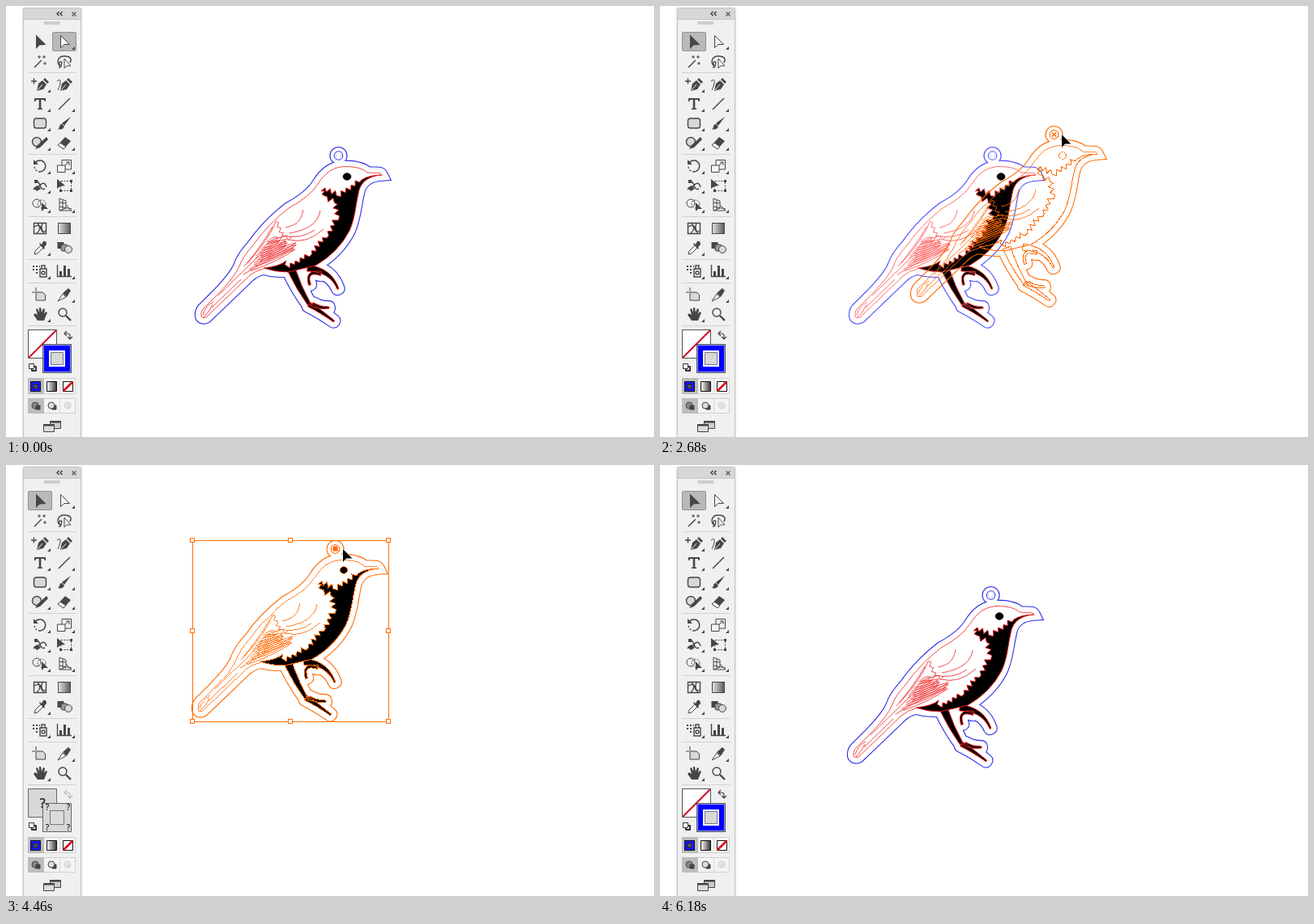
Animation of 800x533 px, one loop 6.55 s. Source, as an HTML page:

```html
<!DOCTYPE html>
<html lang="en">
<head>
<meta charset="utf-8">
<title>Moving a drawing</title>
<style>
html, body { margin: 0; width: 100%; height: 100%; overflow: hidden; background: #fff; }
svg { display: block; width: 800px; height: 533px; }
.cut { fill: none; stroke: var(--cut); }
.etch { fill: none; stroke: var(--etch); stroke-width: .8; }
.ink { fill: var(--ink); stroke: var(--etch); }
.eye { fill: var(--ink); stroke: var(--edge); }
.plain { --cut: #2c2ce6; --etch: #ee1c1c; --ink: #000; --edge: #000; }
.dim { --cut: #4a4aff; --etch: #ff4848; --ink: #000; --edge: #000; }
.picked { --cut: #ff6a00; --etch: #ff6a00; --ink: #000; --edge: #ff6a00; }
.ghost { --cut: #ff6a00; --etch: #ff6a00; --ink: none; --edge: #ff6a00; }
.picked, .ghost { shape-rendering: crispEdges; }
.hull { stroke-linejoin: round; }
.icon { fill: none; stroke: #464646; stroke-width: 1.4; }
.icon .f { fill: #464646; stroke: none; }
.icon .l { fill: #d8d8d8; }
.icon .w { fill: #f4f4f4; }
.thin { stroke-width: 1; }
.q { font: 600 10px "Open Sans", sans-serif; text-anchor: middle; fill: #222; }
</style>
</head>
<body>
<svg viewBox="0 0 800 533">
  <defs>
    <linearGradient id="fade"><stop stop-color="#fff"/><stop offset="1" stop-color="#333"/></linearGradient>
    <linearGradient id="soft"><stop stop-color="#e4e4e4"/><stop offset="1" stop-color="#5a5a5a"/></linearGradient>
    <g id="hull" class="hull"></g>
    <mask id="rim" maskUnits="userSpaceOnUse" x="220" y="160" width="270" height="250">
      <use href="#hull" fill="#fff" stroke="#fff" stroke-width="15.800"/>
      <use href="#hull" fill="#000" stroke="#000" stroke-width="13.600"/>
    </mask>
    <g id="bird"></g>
  </defs>
  <use id="base" href="#bird"/>
  <g id="frame" fill="#fff" stroke="#ff6a00"></g>
  <g id="ghost" class="ghost">
    <use href="#bird"/>
    <path d="M408 182.500l5 5m0-5l-5 5" stroke="#ff6a00" fill="none"/>
  </g>

  <g id="panel">
    <rect x="19.500" y="1.500" width="75" height="540" rx="3" fill="#ececec"/>
    <rect x="21.500" y="2.500" width="71" height="540" rx="2" fill="#f0f0f0" stroke="#c4c4c4"/>
    <path d="M22 16V4q0-1 1-1H91q1 0 1 1V16z" fill="#d7d7d7"/>
    <path d="M22 16.500H92" stroke="#c4c4c4"/>
    <path d="M65.500 7l-2.500 2.500 2.500 2.500M69.500 7l-2.500 2.500 2.500 2.500" fill="none" stroke="#333" stroke-width="1.300"/>
    <path d="M81.500 7.500l5 5m0-5l-5 5" stroke="#666" stroke-width="1.600"/>
    <path d="M47 21H67" stroke="#aaa" stroke-width="4" stroke-dasharray="1 1"/>
    <rect id="hover" x="27.500" y="32.500" width="29" height="23" rx="1.500" fill="#e0e0e0" stroke="#aaa"/>
    <rect id="active" y="32.500" width="29" height="23" rx="1.500" fill="#bab8b8" stroke="#949191"/>
    <g id="tools"></g>

    <g id="solid">
      <path d="M27.500 400.500h35v35h-35z" fill="#fff" stroke="#555"/>
      <path d="M28 435L62 401" stroke="#c8102e" stroke-width="2"/>
      <path d="M45.500 418.500h35v35h-35z" fill="#00f" stroke="#555"/>
      <path d="M46.500 419.500h33v33h-33z" fill="none" stroke="#fff" stroke-width=".6"/>
      <path d="M54 427h18v18h-18z" fill="#d8d8d8" stroke="#fff" stroke-width="2"/>
      <path d="M55.500 428.500h15v15h-15z" fill="none" stroke="#777"/>
    </g>
    <g id="mixed">
      <path d="M27.500 400.500h35v35h-35z" fill="#d8d8d8" stroke="#666"/>
      <text class="q" x="45" y="424" style="font-size:16px">?</text>
      <path d="M45.500 418.500h35v35h-35z" fill="#d8d8d8" stroke="#666"/>
      <path d="M54.500 427.500h17v17h-17z" fill="#dcdcdc" stroke="#777"/>
      <g class="q"><text x="51" y="427">?</text><text x="77" y="427">?</text><text x="51" y="452">?</text><text x="77" y="452">?</text></g>
    </g>
    <path id="swap" d="M75 402l-3 3 3 3M72 405h4q3 0 3 3v4M76 409l3 3 3-3" fill="none" stroke="#444" stroke-width="1.200"/>
    <path d="M31.500 445.500h6v6h-6z" fill="#333" stroke="#333"/><path d="M33 447h3v3h-3z" fill="#fff"/>
    <path d="M28.500 442.500h6v6h-6z" fill="#fff" stroke="#333"/>

    <path d="M27.500 460.500h58v19h-58zM27.500 485.500h58v18h-58z" fill="#f4f4f4" stroke="#d0d0d0"/>
    <path d="M27 460h20v20h-20zM27 485h20v19h-20z" fill="#bdbdbd"/>
    <path d="M66.500 461v19M66.500 486v17" stroke="#d8d8d8"/>
    <path d="M30.500 464.500h12v12h-12z" fill="#1616ff" stroke="#111"/><path d="M34 468h5v5h-5z" fill="#555" stroke="#222"/>
    <path d="M50.500 464.500h12v12h-12z" fill="url(#fade)" stroke="#111"/>
    <path d="M70.500 464.500h12v12h-12z" fill="#fff" stroke="#111"/><path d="M71 476L82 465" stroke="#e01020" stroke-width="2.800"/>
    <g stroke="#444"><circle cx="36" cy="494" r="4" fill="#888"/><path d="M37 494h5v5h-5z" fill="#444"/>
      <path d="M57 494h5v5h-5z" fill="#444"/><circle cx="56" cy="494" r="4" fill="#ddd"/></g>
    <g stroke="#ccc" fill="#eee"><circle cx="76" cy="494" r="4"/><path d="M75 493h3v3h-3z"/></g>
    <path d="M54.500 513.500h13v9h-13z" fill="#ccc" stroke="#444"/><path d="M54 514.500h14" stroke="#444" stroke-width="2"/>
    <path d="M46.500 517.500h13v9h-13z" fill="#ddd" stroke="#444"/><path d="M46 518.500h14" stroke="#444" stroke-width="2"/>
  </g>

  <g id="cursor">
    <path d="M0 0V16L4 11.500 11.500 11.500z" stroke="#fff" stroke-width="1.200" paint-order="stroke"/>
    <path id="hint" d="M7.500 14.500h4v4h-4z" fill="#fff" stroke="#000" stroke-width="1.200"/>
  </g>
</svg>
<script>
const $ = id => document.getElementById(id);
const LOOP = 6550, TICK = 76.5;
const mix = (a, b, f) => a.map((v, k) => v + (b[k] - v) * f);

let seed = 7;
const random = () => (seed = seed * 16807 % 2147483647) / 2147483647;

// Ragged plumage edge along a few key points.
function ragged(points, depth) {
  let d = '';
  for (let i = 1; i < points.length; i++) {
    const a = points[i - 1], b = points[i];
    const len = Math.hypot(b[0] - a[0], b[1] - a[1]), n = Math.round(len / 3.5);
    for (let k = 1; k <= n; k++) {
      const [x, y] = mix(a, b, k / n), r = (k % 2 - .5) * depth * (.5 + random());
      d += `L${(x + (b[1] - a[1]) / len * r).toFixed(1)} ${(y - (b[0] - a[0]) / len * r).toFixed(1)}`;
    }
  }
  return d;
}

// Curved band from a to b, bent towards c, narrowing from w to v.
function limb(a, c, b, w, v) {
  const side = (p, from, to, h) => {
    const dx = to[0] - from[0], dy = to[1] - from[1], l = Math.hypot(dx, dy);
    return [p[0] + dy / l * h, p[1] - dx / l * h].map(n => n.toFixed(1));
  };
  const edge = s => [side(a, a, c, s * w / 2), side(c, a, b, s * (w + v) / 4), side(b, c, b, s * v / 2)];
  const l = edge(1), r = edge(-1);
  return `M${l[0]}Q${l[1]} ${l[2]}L${r[2]}Q${r[1]} ${r[0]}Z`;
}

// Long slim feathers fanned between the rear and front edge of the wing.
function feathers(count) {
  let d = '';
  for (let i = 0; i < count; i++) {
    const f = i / (count - 1);
    const rear = mix([287, 335], [318, 294], f), front = mix([383, 288], [336, 286], f);
    const a = mix(rear, front, random() * .25), b = mix(rear, front, 1 - random() * .3);
    const [x, y] = mix(a, b, .6);
    d += `M${a}Q${x} ${y - 5} ${b}Q${x + 6} ${y + 2} ${mix(a, b, .15)}`;
  }
  return d;
}

function drawBird() {
  const back = 'M464 209C462 205 458 207 446 206Q438 198 416 198.500Q397 200 385 220Q375 236 349 250Q322 271 305 296Q292 310 288 322Q283 334 262 356L243 375Q240 379 241 384Q243 387 247 385L300 334Q308 327 318 325';
  const belly = 'Q410 305 424 278C431 262 431 250 435 232C438 214 452 210 464 209';
  const breast = 'M318 324Q332 329 348 329L382 321' + belly + 'Q448 209 439 215' +
    ragged([[439, 215], [412, 233], [390, 226], [392, 236], [406, 242], [409, 260], [397, 283], [376, 306], [346, 323]], 5) + 'L346 315Q338 322 318 324Z';
  const legs = limb([352, 325], [361, 348], [375, 370], 10, 4) + limb([374, 369], [388, 377], [405, 390], 6, 2) +
    limb([378, 369], [388, 374], [399, 373], 5, 2) + limb([372, 324], [401, 326], [410, 350], 8, 2) +
    limb([389, 331], [369, 326], [375, 345], 5, 3);
  const wing = 'M333 266' + ragged([[333, 266], [342, 285], [352, 288]], 5) +
    'M367 252C364 268 357 271 345 274M388 253C385 270 371 277 350 281M341 284Q364 289 381 277M349 289Q371 295 392 276M333 267Q325 288 298 318M329 273Q316 296 294 322';
  const tail = 'M312 309L262 358M290 338L254 373M243 382Q246 371 256 366M244 385Q252 377 255 369';

  $('hull').innerHTML = `<path d="${back}Q334 330 350 327L382 321${belly}Z" stroke-linejoin="miter"/>
    <path d="${legs}"/><circle cx="410.500" cy="185" r="3.200"/>`;
  $('bird').innerHTML = `<rect x="220" y="160" width="270" height="250" fill="var(--cut)" mask="url(#rim)"/>
    <circle class="cut" cx="410.500" cy="185" r="5.300"/>
    <path class="etch" d="${back + wing + tail + feathers(11)}"/>
    <path class="ink" d="${legs}"/><path class="ink" d="${breast}"/>
    <ellipse class="eye" cx="421" cy="211" rx="4.800" ry="4.200"/>`;
}

function drawFrame() {
  let s = '<path d="M234.500 174.500h242v224h-242z" fill="none"/>';
  for (let i = 0; i < 9; i++) {
    if (i === 4) continue;
    s += `<rect x="${231.5 + i % 3 * 121}" y="${171.5 + (i / 3 | 0) * 112}" width="5" height="5"/>`;
  }
  $('frame').innerHTML = s + '<path d="M408 182h5v5h-5z" fill="#ff6a00"/>';
}

// Groups of rows: left icon, right icon, and which of them has a corner mark.
const p = (d, c = '') => `<path d="${d}" class="${c}"/>`;
const nib = p('M-6 8L-4-1 1-5 6 0 2 6Z', 'f') + p('M2-6L4-8 9-3 7-1Z', 'f') + '<path d="M-5 7L1 0" stroke="#eee" stroke-width="1"/>';
const groups = [[
  [p('M-5-8.500V9L-.5 4.500 7.500 4Z', 'f'), p('M-4.500-7.500V7.500L0 3.500 6.500 3.500Z', 'w thin'), 'R'],
  [p('M-7 8L2-1') + p('M-1-7v4m-2-2h4M5-7v4m-2-2h4M6 1v4m-2-2h4', 'thin'), p('M-5 6C-10 4-9-6 0-6S9-1 7 2M-5 6q-3-4 0-5t1 5q0 2-3 2') + p('M0-3V9L3 6 8 6Z', 'w thin'), '']
], [
  [p('M-11-4h7m-3.500-3.500v7') + `<g transform="translate(2)">${nib}</g>`, `<g transform="translate(1)">${nib}</g>` + p('M-9-4q5-4 4 2t-3 9', 'thin'), 'L'],
  [p('M-7-7H7V-3H5.500L5-5H1.300V5.500H3V7H-3V5.500H-1.300V-5H-5L-5.500-3H-7Z', 'f'), p('M-7 7L7-7'), 'LR'],
  ['<rect x="-7.500" y="-6" width="15" height="12" rx="3" class="l"/>', p('M8-8L0 3-3 0Z', 'f') + p('M-3 1C-7 1-5 6-8 7Q-2 9 0 4Z', 'f'), 'LR'],
  ['<circle cx="-4" cy="-1" r="5.500" class="l"/>' + p('M-6 8L-3 3 8-7 10-4 0 6Z', 'f'), p('M-8 3L1-7 8-2-1 8Z', 'f') + p('M-8 3L-5 0 2 5-1 8Z', 'w thin'), 'LR']
], [
  [p('M-6-4A7 7 0 1 1 0 7') + p('M-8-8V-2H-2Z', 'f') + '<path d="M0 7A7 7 0 0 1-7 0" stroke-dasharray="2 2"/>', p('M-3-7.500H8.500V4H-3Z', 'thin') + p('M-8.500-1H1V7.500H-8.500Z', 'w thin') + p('M1-1L6-5M2-5h4v4', 'thin'), 'LR'],
  [p('M-8 5C-4-1-2 3 0 0S6-5 8 2M-6-6Q-2-6 0 0T6 4') + p('M-8 3l5-3 4 4-5 3zM-7-7h4v4h-4z', 'f'), '<path d="M-4-5.500H8.500V6.500H-5Z" stroke-dasharray="2 1.500" class="thin"/>' + p('M-9-8V4L-5 1 1 0ZM7-7h3v3h-3zM7 5h3v3h-3zM-6 5h3v3h-3z', 'f'), 'L'],
  ['<circle cx="-4" cy="-2" r="5" class="thin"/><circle cx="2" cy="-1" r="5" class="thin" stroke-dasharray="2 1.500"/>' + p('M2-3V8L5 5 10 5Z', 'f'), p('M-6-8V7H9M-6-8L2-5V4L-6 7M-6-3L2-2M-6 2L9 5M-2-6V6M2 0L9 7', 'thin'), 'LR']
], [
  [p('M-7.500-6.500h15v13h-15zM-7-2Q0-6 1 0T7 3M-3-6Q3 0-4 6M3-6Q0 0 5 6'), '<rect x="-7.500" y="-6.500" width="15" height="13" fill="url(#soft)" class="thin"/>', ''],
  [p('M-7 8L-6 4 1-3 4 0-3 7Z', 'w thin') + p('M-1-5L5 2 6 0 5-1 8-4Q8-9 4-8L2-4 0-6Z', 'f'), p('M-8.500-7h8v8h-8z', 'f') + '<rect x="-4" y="-4" width="8" height="8" rx="2" fill="#999" class="thin"/><circle cx="5" cy="2" r="4.500" class="l thin"/>', 'L']
], [
  [p('M0-3h8v10h-8zM2-3v-4h4v4', 'w') + '<circle cx="4" cy="2" r="2"/><path d="M-9-6h9M-9-2h7M-5 2h3" stroke-width="2" stroke-dasharray="2"/>', p('M-8.500-8V6.500H9') + p('M-6 0h3v6h-3zM-1-7h3v13h-3zM4-3h3v9h-3z', 'f'), 'LR']
], [
  [p('M-5-3H3L6.500 0V7H-5Z', 'l thin') + p('M-10-3h4M-5-9v5', 'thin'), p('M-8 8L-2-1 2 3Z', 'w thin') + p('M-2-2L5-8 8-5 3 3Z', 'f'), 'R'],
  [p('M-3 8L-8 1-6-1-3 1-5-6-3-7-1-2-1-8 1-8 2-2 4-7 6-6 5 0 7-3 9-2 5 8Z', 'f'), '<circle cx="-2" cy="-2" r="5"/><path d="M2 2L8 8" stroke-width="2.400"/>', 'L']
]];

function drawTools() {
  const icon = (x, y, s) => `<g class="icon" transform="translate(${x} ${y})">${s}</g>`;
  const mark = (x, y) => `<path d="M${x} ${y + 6}v4h-4z" fill="#444"/>`;
  let y = 44, s = '';
  for (const rows of groups) {
    for (const [left, right, marks] of rows) {
      s += icon(42, y, left) + icon(72, y, right);
      if (marks.includes('L')) s += mark(55, y);
      if (marks.includes('R')) s += mark(85, y);
      y += 24;
    }
    y += 5;
    s += `<path d="M27 ${y - 14.5}H87" stroke="#d2d2d2"/>`;
  }
  $('tools').innerHTML = s;
}

// Stops: start, end, place reached.
const drags = [[0, 0, [0, 0]], [2380, 2840, [109, -38]], [3920, 4380, [-4, -81]], [4870, 5170, [-2, -24]]];
const drops = [0, 2990, 4460, 5320];
const trips = [
  [0, 0, [335, 500]], [540, 980, [38, 43]], [1300, 1830, [432, 179]], [1910, 1990, [419, 180]],
  [5320, 5470, [613, 250]], [5640, 6103, [764, 511]]
];

// Glide from the previous stop in even ticks, slowing towards the end.
function place(stops, t) {
  const k = stops.findLastIndex(s => s[0] <= t);
  const [t0, t1, to] = stops[k];
  if (!k) return to;
  const gaps = Math.round((t1 - t0) / TICK);
  const u = Math.min(1, (Math.floor((t - t0) / (t1 - t0) * gaps + 1e-6) + 1) / (gaps + 1));
  return mix(stops[k - 1][2], to, u * (1.5 - u * .5));
}
const within = (t, ...spans) => spans.some(([a, b]) => t >= a && t < b);
const show = (id, on) => $(id).style.display = on ? '' : 'none';
const put = (id, [x, y]) => $(id).setAttribute('transform', `translate(${Math.round(x)} ${Math.round(y)})`);

function render(t) {
  const dragging = drops.some((end, k) => within(t, [drags[k][0], end]));
  const picked = within(t, [2990, 5640]);
  const home = drags[drops.findLastIndex(d => d <= t)][2];
  const held = place(drags, t);

  put('base', home);
  put('frame', home);
  put('ghost', held);
  $('base').setAttribute('class', dragging ? 'dim' : picked ? 'picked' : 'plain');
  show('ghost', dragging);
  show('frame', picked);
  $('frame').lastChild.style.display = dragging ? 'none' : '';

  put('cursor', within(t, [2380, 5320]) ? [held[0] + 420, held[1] + 185] : place(trips, t));
  show('cursor', within(t, [540, 6180]));
  show('hint', within(t, [1990, 2210], [2990, 3770]));

  show('hover', within(t, [980, 1130]));
  $('active').setAttribute('x', t < 1130 ? 57.5 : 27.5);
  show('mixed', picked);
  show('solid', !picked);
  $('swap').style.opacity = picked ? .3 : 1;
}

drawBird();
drawFrame();
drawTools();
render(0);
let start;
requestAnimationFrame(function tick(now) {
  start ??= now;
  render((now - start) % LOOP);
  requestAnimationFrame(tick);
});
</script>
</body>
</html>
```
